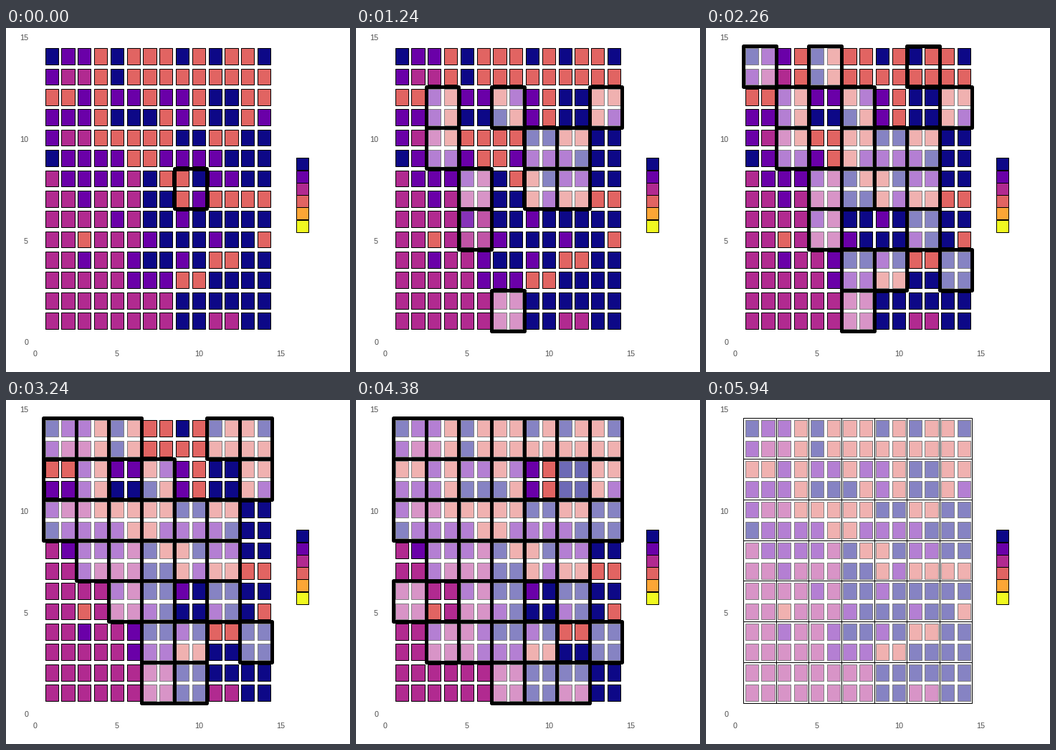
These frames come from a looping animation (480 by 480 pixels, 6 s). A matplotlib script:

```python
import matplotlib.pyplot as plt
import numpy as np
from matplotlib.animation import FuncAnimation
from matplotlib.collections import PolyCollection

SIZE, DPI = 480, 100
FRAMES, STEP = 300, 20
PX = 72 / DPI  # one pixel in points
PACE = 5.97    # frames between two new blocks
LAST = 297     # outlines turn thin here
PLASMA = ["#0D0887", "#6A00A8", "#B12A90", "#E16462", "#FCA636", "#F0F921"]
N, P, M, S = range(4)  # navy, purple, magenta, salmon

# blocks as column + row, counted from the bottom left, in order of arrival
ORDER = """
54 55 76 46 25 65 26 34 64 41 33 37 72 45 44 63 42 17 52 67 35 43 77 15 51
27 24 16 61 47 32 36 57 75 22 13 66 56 74 62 11 31 71 53 23 73 12 21 14
""".split()
STARTS = (PACE * np.arange(len(ORDER))).astype(int)


def landscape():
    """Colour index per [row, column], both counted from 1."""
    g = np.full((15, 15), S)
    # broad areas
    g[:9, :7] = M
    g[:9, 7:] = N
    g[:3, 7:9] = M
    g[9:, :4] = P
    g[9, 4:12] = P
    g[9, 12:] = N
    # streaks and regular strays, top to bottom
    g[9::5, 1] = N
    g[14, 11::3] = N
    g[14, 9] = N
    g[13:, 5] = N
    g[10:14:3, 2:4] = M
    g[12, :3] = S
    g[12, 3:10] = P
    g[12, 4:11:3] = S
    g[11, 5:8] = N
    g[11, 9::5] = P
    g[11:13, 11:13] = N
    g[10, 9:11] = g[10, 13:] = N
    g[9, 6:8] = S
    g[8, 2:6] = g[8, 11:13] = P
    g[8, 8:10] = S
    g[7, 3::7] = P
    g[7, 9::2] = g[7, 12::2] = S
    g[6, 5:10:4] = P
    g[5, 7:12:4] = P
    g[5, 3::11] = S
    g[4, 3:10:3] = P
    g[4, 11:13] = S
    g[3, 6:9] = P
    g[3, 9:11] = S
    g[1, 11:13] = M
    return g


def snap(v):
    return np.floor(v) + 0.5


def sx(x):
    return 41.33 + 22.8 * x


def sy(y):
    return 437.49 - 28.39 * y


def box(x0, y0, x1, y1):
    x0, y0, x1, y1 = map(snap, (x0, y0, x1, y1))
    return [(x0, y0), (x1, y0), (x1, y1), (x0, y1)]


def tile(x, y, half):
    return box(sx(x - half), sy(y + half), sx(x + half), sy(y - half))


fig = plt.figure(figsize=(SIZE / DPI, SIZE / DPI), dpi=DPI, facecolor="white")
ax = fig.add_axes([0, 0, 1, 1])
ax.set(xlim=(0, SIZE), ylim=(SIZE, 0))
ax.axis("off")

grid = landscape()
cells, fills = [], []
for y in range(1, 15):
    for x in range(1, 15):
        cells.append(tile(x, y, 0.4))
        fills.append(PLASMA[grid[y, x]])
for i, color in enumerate(PLASMA):
    top = snap(181.75 + 17.28 * i)
    cells.append(box(405, top, 422, top + 17))
    fills.append(color)
ax.add_collection(PolyCollection(cells, facecolors=fills, edgecolors="black",
                                 linewidths=PX, joinstyle="miter", snap=False))

label = dict(family="Liberation Sans", size=10.8 * PX, color="#4D4D4D",
             va="center_baseline")
for v in range(0, 16, 5):
    ax.text(sx(v) - 0.5, 453.5, str(v), ha="center", **label)
    ax.text(31, sy(v) + 1, str(v), ha="right", **label)

blocks = PolyCollection([tile(2 * int(c) - 0.5, 2 * int(r) - 0.5, 1)
                         for c, r in ORDER], joinstyle="round", snap=False)
ax.add_collection(blocks)


def draw(frame):
    age = frame - STARTS
    shown = age >= 0
    face = np.ones((len(ORDER), 4))
    face[:, 3] = 0.5 * np.clip((age - 1) / 5, 0, 1)
    edge = np.zeros((len(ORDER), 4))
    edge[:, 3] = shown
    width = 1 if frame >= LAST else 5
    blocks.set_facecolor(face)
    blocks.set_edgecolor(edge)
    blocks.set_linewidth(np.where(shown, width * PX, 0))
    return [blocks]


anim = FuncAnimation(fig, draw, frames=FRAMES, interval=STEP,
                     repeat=True, repeat_delay=0, blit=False)
plt.show()
```
